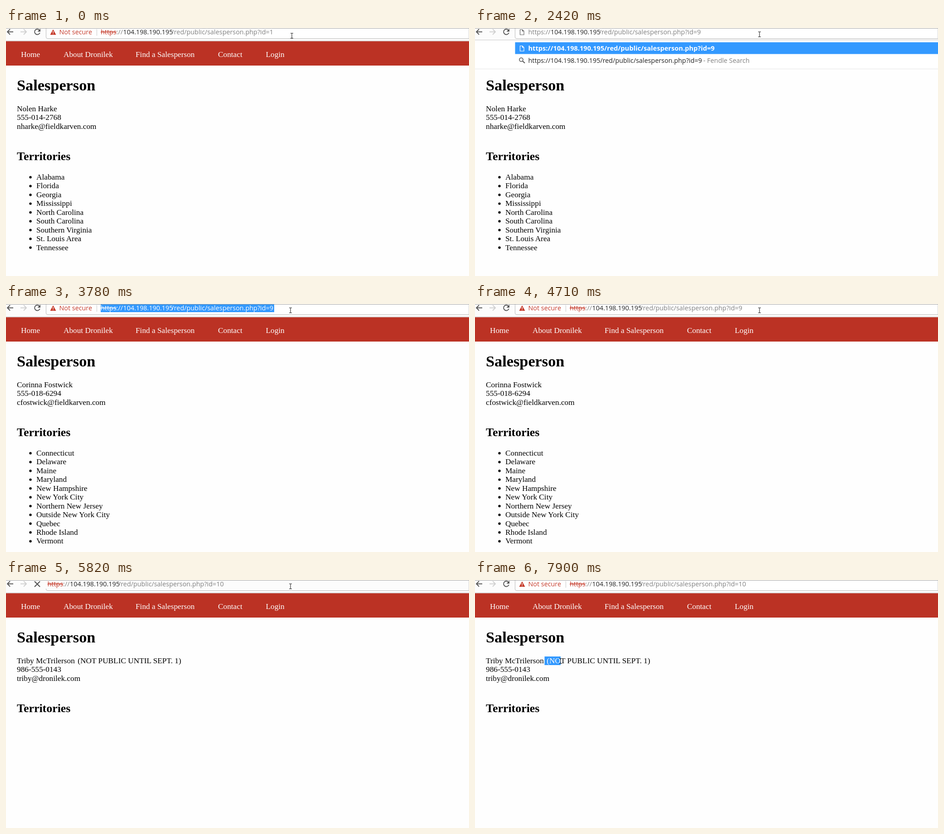
These frames come from a looping animation (1022x548 px, 8000 ms). An HTML page:

```html
<!DOCTYPE html>
<html lang="en">
<head>
<meta charset="utf-8">
<title>Salesperson pages</title>
<style>
html, body { margin: 0; width: 100%; height: 100%; overflow: hidden; background: #fefefe; }
svg { display: block; }
.page { font: 17.28px "Liberation Serif", serif; }
.bar { font: 14.37px "Open Sans", sans-serif; }
</style>
</head>
<body>
<svg id="stage" width="1022" height="548"></svg>
<script>
const BLUE = '#3399ff', RED = '#c53929', GREY = '#808080', INK = '#222';
const LINE = 19.44;
const HOST = '104.198.190.195', PATH = '/red/public/salesperson.php?id=';

const people = {
  1: {
    lines: ['Nolen Harke', '555-014-2768', 'nharke@fieldkarven.com'],
    areas: ['Alabama', 'Florida', 'Georgia', 'Mississippi', 'North Carolina', 'South Carolina',
      'Southern Virginia', 'St. Louis Area', 'Tennessee']
  },
  9: {
    lines: ['Corinna Fostwick', '555-018-6294', 'cfostwick@fieldkarven.com'],
    areas: ['Connecticut', 'Delaware', 'Maine', 'Maryland', 'New Hampshire', 'New York City',
      'Northern New Jersey', 'Outside New York City', 'Quebec', 'Rhode Island', 'Vermont']
  },
  10: {
    lines: ['Triby McTrilerson', '986-555-0143', 'triby@dronilek.com'],
    note: '(NOT PUBLIC UNTIL SEPT. 1)',
    areas: []
  }
};

// Each step changes some properties at a time in ms; the rest carry over.
const steps = [
  [0, { page: 1, id: '1', mode: 'chip', cursor: [631, 17] }],
  [260, { selected: true, cursor: [630, 16] }],
  [390, { cursor: [629, 15] }],
  [520, { cursor: [628, 14] }],
  [1050, { selected: false, caret: true }],
  [1590, { caret: false }],
  [1870, { mode: 'edit', id: '', caret: true, rows: [''] }],
  [1990, { id: '9', rows: ['9'] }],
  [2420, { caret: false }],
  [2540, { mode: 'load' }],
  [2690, { mode: 'opening', page: 9 }],
  [2840, { mode: 'chip' }],
  [3780, { selected: true }],
  [4180, { selected: false, caret: true }],
  [4710, { caret: false }],
  [4850, { mode: 'edit', id: '1', caret: true, rows: ['1', '10', '9'] }],
  [5420, { id: '10', rows: ['10'] }],
  [5820, { mode: 'load', page: 10, caret: false }],
  [5970, { mode: 'chip' }],
  [6780, { cursor: [443, 149], arrow: true }],
  [6930, { cursor: [306, 168], arrow: false }],
  [7080, { cursor: [200, 176] }],
  [7210, { cursor: [156, 179] }],
  [7350, { cursor: [154, 179] }],
  [7780, { cursor: [176, 179], mark: 2 }],
  [7900, { cursor: [189, 179], mark: 3 }]
];

const rect = (x, y, w, h, fill) =>
  `<rect x="${x}" y="${y}" width="${w}" height="${h}" fill="${fill}"/>`;
const path = (d, color, width = 1, fill = 'none') =>
  `<path d="${d}" stroke="${color}" stroke-width="${width}" fill="${fill}"/>`;
const text = (x, y, s, fill = '#000', more = '') =>
  `<text x="${x}" y="${y}" fill="${fill}" ${more}>${s}</text>`;

function drawPage(s) {
  const { lines, note, areas } = people[s.page];
  let out = rect(0, 29.3, 1022, 53.7, '#bb3224');
  [[33, 'Home'], [127, 'About Dronilek'], [286, 'Find a Salesperson'], [468, 'Contact'], [573.5, 'Login']]
    .forEach(([x, label]) => out += text(x, 63.5, label, '#fff'));
  out += text(24, 138, 'Salesperson', '#000', 'font-size="34.3" font-weight="700"');
  out += text(24, 292, 'Territories', '#000', 'font-size="25.92" font-weight="700"');
  lines.forEach((line, i) => out += text(24, 184 + i * LINE, line));
  areas.forEach((area, i) => {
    const y = 335 + i * LINE;
    out += `<circle cx="54" cy="${y - 5.2}" r="2.7"/>` + text(67, y, area);
  });
  if (note) {
    const n = s.mark || 0;
    if (n) out += rect(153.5, 169, n === 3 ? 35.5 : 22.5, 19, BLUE);
    out += text(158.3, 184, `<tspan fill="#fff">${note.slice(0, n)}</tspan>${note.slice(n)}`);
  }
  return `<g class="page">${out}</g>`;
}

function drawUrl(x, s) {
  const color = c => s.selected ? '#fff' : c;
  const scheme = s.mode === 'edit' ? 'https://' :
    `<tspan fill="${color(RED)}" text-decoration="line-through">https</tspan>://`;
  let out = s.selected ? rect(x, 1, 383, 17, BLUE) : '';
  out += text(x, 14, scheme, color(GREY)) + text(x + 49.5, 14, HOST, color(INK)) +
    text(x + 156.5, 14, PATH + s.id, color(GREY));
  if (s.caret) out += rect(x + 375 + 8.2 * s.id.length, 1, 1, 17, '#000');
  return out;
}

const docIcon = (y, color) =>
  path(`M99.5 ${y - 5.5}h5l3.5 3.5v8h-8.5zM104.5 ${y - 5.5}v3.5h3.5`, color, 1.2);

function drawDropdown(rows) {
  let out = rect(0, 27, 1022, 37 + 27 * rows.length, '#fff') +
    rect(0, 26, 1022, 1, '#c8c8c8') + rect(0, 63 + 27 * rows.length, 1022, 1, '#e6e6e6');
  const url = id => 'https://' + HOST + PATH + id;
  out += rect(88.5, 31.5, 934, 26, BLUE) + docIcon(45, '#fff') +
    text(117.5, 49.5, url(rows[0]), '#fff', 'font-size="14.63" font-weight="700"');
  out += `<circle cx="102" cy="70" r="4" fill="none" stroke="#555" stroke-width="1.6"/>` +
    path('M105 73l5 4.5', '#555', 2) +
    text(117.5, 77, url(rows[0]), INK) + text(504, 77, '- Fendle Search', GREY);
  rows.slice(1).forEach((id, i) => {
    const y = 104 + 27 * i;
    out += docIcon(y - 5, '#666') + text(117.5, y, url(id), INK);
  });
  return out;
}

function drawBar(s) {
  const { mode } = s, loading = mode === 'load', opening = mode === 'opening';
  let out = rect(0, 0, 1022, 28, '#fcfcfc') + rect(0, 28, 1022, 1, '#c8c8c8');
  out += path(`M88.5 ${loading ? 19 : 0}V20Q88.5 23.5 92 23.5H1022V0`, '#b8b8b8', 1, loading ? 'none' : '#fff');
  out += rect(0, 0, 1022, 1, '#a0a0a0');
  out += path('M16 8.5H3M9 2.5L3 8.5L9 14.5', '#555', 1.9);
  out += path('M32 8.5H45M39 2.5L45 8.5L39 14.5', '#d0d0d0', 1.9);
  out += loading
    ? path('M63 3L75 15M75 3L63 15', '#555', 2.2)
    : path('M74 5A6 6 0 1 0 74.8 10.5', '#555', 1.9) + '<path d="M76 1.5V8H69.5z" fill="#555"/>';

  if (mode === 'edit') {
    out += docIcon(9, '#666') + drawUrl(117.5, s) + drawDropdown(s.rows);
  } else if (loading) {
    out += drawUrl(91.5, s);
  } else {
    const shift = opening ? 12 : 0;
    out += `<path d="M104 3L110.5 15H97.5z" fill="${RED}"/>` + rect(103.3, 7, 1.4, 4, '#fff') +
      rect(103.3, 12, 1.4, 1.4, '#fff') + text(117.5, 14, opening ? 'Not secu…' : 'Not secure', RED) +
      rect(200 - shift, 2, 1, 15, '#c8c8c8') + drawUrl(209 - shift, s);
  }
  return `<g class="bar">${out}</g>`;
}

function drawCursor({ cursor: [x, y], arrow }) {
  return arrow
    ? path(`M${x + .5} ${y + .5}v11l2.6-2.4 1.8 3.8 1.8-.9-1.8-3.6h3.3z`, '#000', .8, '#fff')
    : path(`M${x - 3} ${y - 5.5}h2.5l.5.5.5-.5h2.5M${x} ${y - 5}v10M${x - 3} ${y + 5.5}h2.5l.5-.5.5.5h2.5`, INK, 1.1);
}

const stage = document.getElementById('stage');
let shown = -1;

function tick() {
  const t = performance.now() % 8000;
  const count = steps.filter(([at]) => at <= t).length;
  if (count !== shown) {
    shown = count;
    const s = Object.assign({}, ...steps.slice(0, count).map(step => step[1]));
    stage.innerHTML = rect(0, 0, 1022, 548, '#fefefe') + drawPage(s) + drawBar(s) + drawCursor(s);
  }
  requestAnimationFrame(tick);
}
tick();
</script>
</body>
</html>
```
